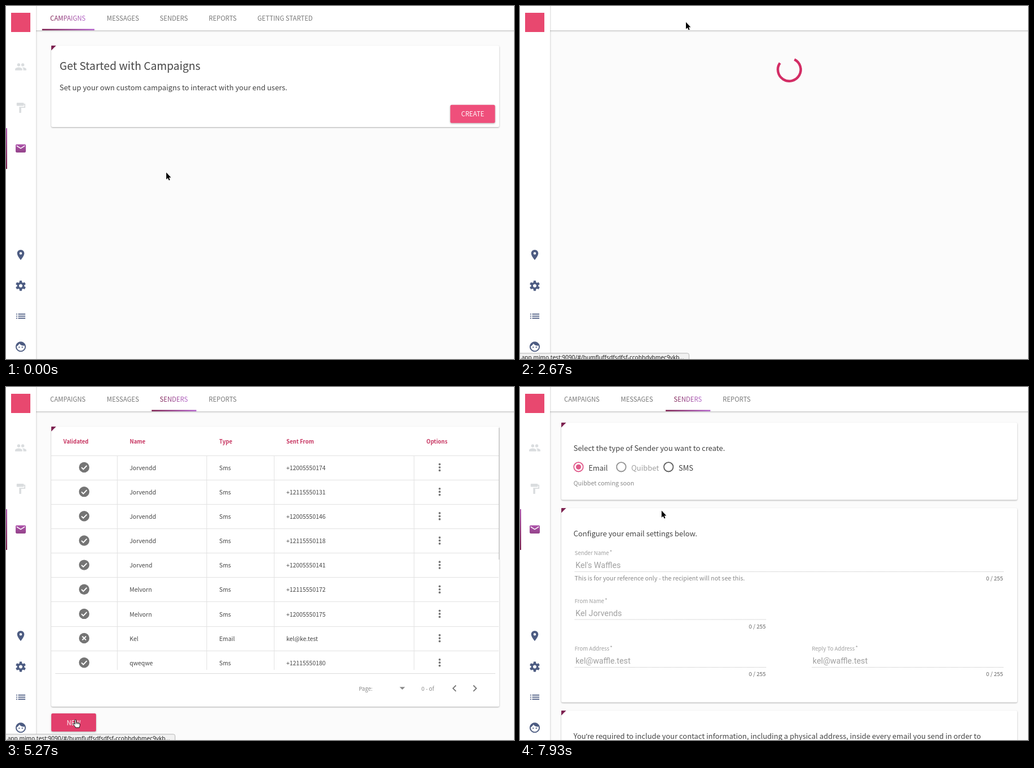
An HTML page for the animation above (8000 ms loop, 897 by 624 pixels).

```html
<!DOCTYPE html>
<html lang="en">
<head>
<meta charset="utf-8">
<title>Senders walkthrough</title>
<style>
  html, body { margin: 0; width: 100%; height: 100%; overflow: hidden; background: #fbfbfb; }
  svg { display: block; width: 897px; height: 624px; }
  text { font-family: "Noto Sans CJK SC", "Noto Sans CJK JP", "Noto Sans CJK", "Noto Sans", sans-serif; }
  .tab { letter-spacing: .08px; }
  .field { font-family: Roboto, sans-serif; }
  .address { font-family: "Noto Sans", "Open Sans", sans-serif; }
  .header { fill: #fff; filter: drop-shadow(0 1px 1.5px rgba(0,0,0,.27)); }
  .side { fill: #fff; filter: drop-shadow(.7px 0 1.8px rgba(0,0,0,.3)); }
  .card { fill: #fff; filter: drop-shadow(0 1px 1px rgba(0,0,0,.32)); }
  .button { filter: drop-shadow(0 1.5px 1.5px rgba(0,0,0,.3)); }
</style>
</head>
<body>
<svg id="stage" viewBox="0 0 897 624" xmlns="http://www.w3.org/2000/svg"></svg>
<script>
const LOOP = 8000;
const INK = '#454545', GREY = '#757575', PALE = '#a0a0a0', SLATE = '#4d5c82', PLUM = '#7d2150';
// Text sizes of the interface, from large to small
const H1 = 19.2, BODY = 12.91, TAB = 11.17, HINT = 10.73, CELL = 10.4, SMALL = 9.6;

const text = (s, x, y, size, fill = INK, attrs = '') =>
  `<text x="${x}" y="${y}" font-size="${size}" fill="${fill}" ${attrs}>${s}</text>`;
const rect = (x, y, w, h, fill, attrs = '') =>
  `<rect x="${x}" y="${y}" width="${w}" height="${h}" fill="${fill}" ${attrs}/>`;
const circle = (x, y, r, attrs) => `<circle cx="${x}" cy="${y}" r="${r}" ${attrs}/>`;
const path = (d, attrs) => `<path d="${d}" ${attrs}/>`;
const line = (d, stroke, attrs = '') => path(d, `fill="none" stroke="${stroke}" ${attrs}`);
const group = (id, body) => `<g id="${id}">${body}</g>`;
const icon = (y, fill, body) =>
  `<g transform="translate(26 ${y}) scale(.9) translate(-12 -12)" fill="${fill}">${body}</g>`;

const card = (x, y, w, h) => rect(x, y, w, h, '#fff', 'class="card" rx="2.5"') +
  path(`M${x} ${y}h8.4l-8.4 8.4z`, `fill="${PLUM}"`);
const button = (x, y, label, id) =>
  rect(x, y, 79, 32, '#ef4f7b', `id="${id}" class="button" rx="2.5"`) +
  text(label, x + 39.5, y + 20.5, TAB, '#fff', 'class="tab" text-anchor="middle"');

const TABS = [['CAMPAIGNS', 78, 92.5], ['MESSAGES', 178, 87], ['SENDERS', 271.5, 79],
              ['REPORTS', 358, 79], ['GETTING STARTED', 444, 128]];
const tabs = (active, count) => TABS.slice(0, count).map(([label, x, w], i) =>
  text(label, x, 26, TAB, i === active ? 'url(#across)' : GREY, 'class="tab"') +
  (i === active ? rect(x - 14.3, 40.5, w, 2.5, 'url(#across)') : '')).join('');

const gear = line('M12 6.8a5.2 5.2 0 1 0 .01 0z', SLATE, 'stroke-width="3.6"') +
  [0, 60, 120, 180, 240, 300].map(a =>
    path('M9.2 6.5L9.8 2H14.2L14.8 6.5z', `transform="rotate(${a} 12 12)"`)).join('');

const sidebar =
  rect(-5, -5, 58, 640, '#fff', 'class="side"') +
  rect(9, 12, 34, 34, '#e8486f') +
  icon(440, SLATE, path('M12 2C8.13 2 5 5.13 5 9c0 5.25 7 13 7 13s7-7.75 7-13c0-3.87-3.13-7-7-7zm0 9.5a2.5 2.5 0 0 1 0-5 2.5 2.5 0 0 1 0 5z', '')) +
  icon(494.5, SLATE, gear) +
  icon(548.3, SLATE, path('M3 7h2v2H3zm0 4h2v2H3zm0 4h2v2H3zM7 7h14v2H7zm0 4h14v2H7zm0 4h14v2H7z', '')) +
  icon(602.3, SLATE, circle(9, 13, 1.25, '') + circle(15, 13, 1.25, '') +
    path('M12 2a10 10 0 1 0 .01 0zm0 18a8 8 0 0 1-7.95-8.86c2.36-1.05 4.23-2.98 5.21-5.37 2.3 3.2 6.3 4.8 10.41 3.97A8 8 0 0 1 12 20z', 'fill-rule="evenodd"'));

const sections =
  icon(107.5, '#dadddf', circle(8, 8, 3, '') + circle(16, 8, 3, '') +
    path('M8 13c-2.33 0-7 1.17-7 3.5V19h14v-2.5c0-2.33-4.67-3.5-7-3.5zm8 0l-1 .05c1.2.9 2 2 2 3.45V19h6v-2.5c0-2.33-4.67-3.5-7-3.5z', '')) +
  icon(180, '#dadddf', path('M18 4V3a1 1 0 0 0-1-1H5a1 1 0 0 0-1 1v4a1 1 0 0 0 1 1h12a1 1 0 0 0 1-1V6h1v4H9v11a1 1 0 0 0 1 1h2a1 1 0 0 0 1-1v-9h8V4z', '')) +
  icon(251.7, 'url(#mail)', path('M20 4H4a2 2 0 0 0-2 2v12a2 2 0 0 0 2 2h16a2 2 0 0 0 2-2V6a2 2 0 0 0-2-2zm0 4l-8 5-8-5V6l8 5 8-5z', '')) +
  rect(0, 216, 2, 72, 'url(#down)');

const campaigns = tabs(0, 5) + card(80, 70, 791, 144) +
  text('Get Started with Campaigns', 94.5, 113, H1) +
  text('Set up your own custom campaigns to interact with your end users.', 94.5, 149.3, BODY) +
  button(784.5, 174.7, 'CREATE', 'create');

const phone = (area, end) => `+1${area}55501${end}`;
const ROWS = [
  ['Jorvendd', 'Sms', phone(200, 74)], ['Jorvendd', 'Sms', phone(211, 31)],
  ['Jorvendd', 'Sms', phone(200, 46)], ['Jorvendd', 'Sms', phone(211, 18)],
  ['Jorvend', 'Sms', phone(200, 41)], ['Melvorn', 'Sms', phone(211, 72)],
  ['Melvorn', 'Sms', phone(200, 75)], ['Kel', 'Email', 'kel@ke.test', true],
  ['qweqwe', 'Sms', phone(211, 80)]];

const tableRow = ([name, type, from, failed], i) => {
  const y = 142 + i * 43.15;
  const mark = failed ? `M134.7 ${y - 3.3}l6.6 6.6m0-6.6l-6.6 6.6` : `M133.3 ${y + .2}l3.2 3.2 6.2-6.4`;
  return circle(138, y, 9.2, `fill="${GREY}"`) + line(mark, '#fff', 'stroke-width="1.9"') +
    text(name, 218.3, y + 4.6, CELL) + text(type, 376.5, y + 4.6, CELL) + text(from, 495, y + 4.6, CELL) +
    [-5.4, 0, 5.4].map(d => circle(765.7, y + d, 1.85, `fill="${GREY}"`)).join('') +
    line(`M80 ${Math.round(y - 21.5) + .5}H870`, '#e2e2e2');
};
const HEADINGS = [['Validated', 101.3], ['Name', 218.5], ['Type', 376.5], ['Sent From', 495], ['Options', 742.3]];

const senders = tabs(2, 4) + card(80, 70, 791, 495) +
  HEADINGS.map(([s, x]) => text(s, x, 100, SMALL, '#c73561', 'font-weight="700"')).join('') +
  ROWS.map(tableRow).join('') +
  line([196.5, 354.5, 473.5, 720.5].map(x => `M${x} 121V500`).join(''), '#e2e2e2') +
  line('M87 506.5H864', '#dcdcdc') + rect(870, 72, 1, 233, '#c2c2c2') +
  text('Page:', 623, 537, SMALL, '#8a8a8a') + text('0 - of', 733.5, 537, 9.8, '#8a8a8a') +
  path('M695 530.3h9.6l-4.8 4.8z', 'fill="#8a8a8a"') +
  line('M794.5 527.5l-5.2 5.2 5.2 5.2M825.3 527.5l5.2 5.2-5.2 5.2', GREY, 'stroke-width="1.8"') +
  button(80, 577, 'NEW', 'new');

const radio = (x, label, labelX, ring, fill) =>
  circle(x, 141.3, 8.2, `fill="none" stroke="${ring}" stroke-width="1.8"`) +
  text(label, labelX, 147.5, BODY, fill);
const field = (x, right, y, label, sample) =>
  text(`${label} <tspan dx="-1" dy="-1">*</tspan>`, x, y, SMALL, PALE) +
  text(sample, x + 1.5, y + 23, 14.26, PALE, 'class="field"') +
  line(`M${x} ${y + 29.5}H${right}`, '#cfcfcf', 'stroke-dasharray="1.5 .6"') +
  text('0 / 255', right - 1, y + 45.2, 9.8, '#666', 'text-anchor="end"');

const form = tabs(2, 4) + card(73, 63, 805, 136.5) + card(73, 214, 805, 343.5) + card(73, 572, 805, 80) +
  text('Select the type of Sender you want to create.', 94.5, 113, BODY) +
  radio(103.3, 'Email', 121, '#e0598a', INK) + circle(103.3, 141.3, 4.6, 'fill="#e0598a"') +
  radio(178.8, 'Quibbet', 196.5, '#929292', PALE) +
  radio(262.3, 'SMS', 280, '#5c5c5c', INK) +
  text('Quibbet coming soon', 94.5, 174.3, HINT, '#8a8a8a') +
  text('Configure your email settings below.', 94.5, 264, BODY) +
  field(96.5, 854, 297, 'Sender Name', "Kel's Waffles") +
  text('This is for your reference only - the recipient will not see this.', 96.3, 342, HINT, '#8a8a8a') +
  field(96.5, 435, 381.5, 'From Name', 'Kel Jorvends') +
  field(96.5, 435, 466, 'From Address', 'kel@waffle.test') +
  field(515.3, 854, 466, 'Reply To Address', 'kel@waffle.test') +
  text('You<tspan class="address">’</tspan>re required to include your contact information, including a physical address, inside every email you send in order to', 94.5, 622, BODY);

const gradient = (id, x2, y2, from, to) =>
  `<linearGradient id="${id}" x2="${x2}" y2="${y2}"><stop stop-color="${from}"/><stop offset="1" stop-color="${to}"/></linearGradient>`;

const stage = document.getElementById('stage');
stage.innerHTML =
  `<defs>${gradient('across', 1, 0, PLUM, '#b566cc')}${gradient('down', 0, 1, '#b159b0', PLUM)}` +
  `${gradient('mail', 0, 1, '#ae55ab', '#94438a')}</defs>` +
  rect(0, 0, 897, 624, '#fbfbfb') +
  group('header', rect(40, -5, 870, 48, '#fff', 'class="header"')) + sidebar +
  group('sections', sections) + group('campaigns', campaigns) +
  group('loading', path('', 'id="arc" fill="none" stroke="#d32d65" stroke-width="4.4"')) +
  group('senders', senders) + group('form', form) +
  group('status', rect(-3, 613.8, 301.5, 20, '#f1f1f1', 'rx="3" stroke="#b5b5b5"') +
    text('.app.mimo.test:9090/#/bumfluffsdfsdfsf-ccohhdybmec9ykb...', 0, 624.8, 10.1, '#222', 'class="address"')) +
  group('cursor',
    path('M0 0V12.2L2.8 9.7 4.7 14 6.6 13.2 4.8 9H8.4Z', 'id="arrow" stroke="#fff" stroke-width="1.6" paint-order="stroke"') +
    path('M-1 1.2C-1-.3 1.4-.3 1.4 1.2V5.5C2.5 4.6 3.6 5 3.8 6 4.9 5.2 6 5.7 6.1 6.7 7.2 6.2 8 6.8 8 7.8V10.5C8 12 7 12.5 7 14.3H0C0 12.5-2 11-4 8.2-4.6 7-3.2 6.2-2.2 7.2L-1 8.5ZM1.4 5.5V8M3.8 6V8.2M6.1 6.7V8.4', 'id="hand" fill="#fff" stroke="#111" stroke-width="1"'));

const el = id => document.getElementById(id);
const show = (id, on) => el(id).setAttribute('display', on ? 'inline' : 'none');
const ease = p => p * p * (3 - 2 * p);
const within = (t, a, b) => t >= a && t < b;

const SCENES = [['campaigns', 2670], ['loading', 4130], ['senders', 6300], ['blank', 6730], ['form', LOOP]];
const POINTER = [[0, 283, 294.3], [500, 283, 294.3], [1500, 293, 28.5], [4380, 293, 28.5],
                 [5060, 122.5, 587.8], [7100, 122.5, 587.8], [7730, 250, 218.5], [LOOP, 250, 218.5]];

function pointerAt(t) {
  const i = POINTER.findIndex(key => key[0] > t);
  const [t0, x0, y0] = POINTER[i - 1], [t1, x1, y1] = POINTER[i];
  const p = ease((t - t0) / (t1 - t0));
  return [x0 + (x1 - x0) * p, y0 + (y1 - y0) * p];
}

// The arc grows and shrinks by turns while its middle advances and the whole ring turns.
function spinnerArc(t) {
  const since = t - 2644, half = since / 656.25, step = Math.floor(half), p = ease(half - step);
  const length = 10 + 270 * (step % 2 ? p : 1 - p);
  const middle = 161 + 135 * (step + p) + since * .156;
  const at = degrees => {
    const a = degrees * Math.PI / 180;
    return `${475.5 + 20.2 * Math.sin(a)} ${112.5 - 20.2 * Math.cos(a)}`;
  };
  return `M${at(middle - length / 2)}A20.2 20.2 0 ${length > 180 ? 1 : 0} 1 ${at(middle + length / 2)}`;
}

function draw() {
  const t = performance.now() % LOOP;
  const scene = SCENES.find(([, end]) => t < end)[0];
  for (const id of ['campaigns', 'loading', 'senders', 'form']) show(id, id === scene);
  show('header', scene !== 'blank');
  show('sections', scene !== 'blank' && scene !== 'loading');
  show('status', within(t, 1530, 3070) || within(t, 5060, 7230));
  if (scene === 'loading') el('arc').setAttribute('d', spinnerArc(t));

  const [x, y] = pointerAt(t);
  const onNew = scene === 'senders' && y > 577;
  const pointing = onNew || (scene === 'campaigns' && y < 42);
  el('cursor').setAttribute('transform', `translate(${x} ${y})`);
  show('hand', pointing);
  show('arrow', !pointing);
  el('new').setAttribute('fill', onNew ? '#e23f6c' : '#ef4f7b');
  requestAnimationFrame(draw);
}
draw();
</script>
</body>
</html>
```
